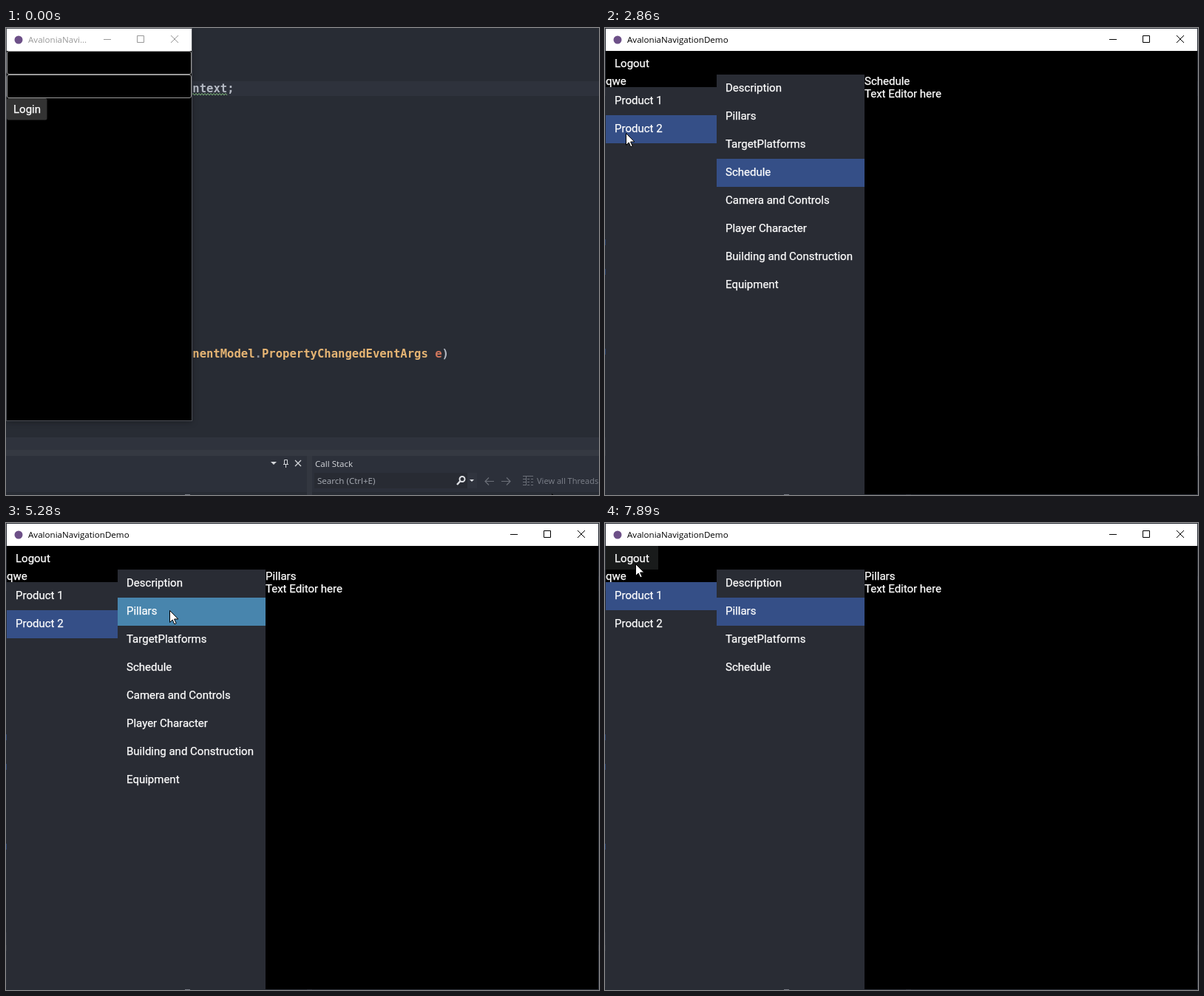
These frames come from a looping animation (802 by 632 pixels, 8000 ms). An HTML page:

```html
<!DOCTYPE html>
<html lang="en">
<head>
<meta charset="utf-8">
<title>Navigation demo</title>
<style>
html, body { margin: 0; width: 100%; height: 100%; overflow: hidden; background: #282c34; }
svg { display: block; width: 802px; height: 632px; }
text { white-space: pre; }
.app { font: 15px Roboto, sans-serif; fill: #fff; stroke: #fff; stroke-width: .25; }
.ui { font: 11.6px "Open Sans", "Noto Sans", sans-serif; }
.code { font: bold 15.57px "DejaVu Sans Mono", monospace; }
.shadow { filter: drop-shadow(0 2px 4px rgba(0, 0, 0, .35)); }
.shadow.active { filter: drop-shadow(0 4px 7px rgba(0, 0, 0, .5)); }
</style>
</head>
<body>
<svg id="stage" viewBox="0 0 802 632"></svg>
<script>
const LOOP = 8000, ACTIVE = 800, FOCUS_2 = 1760, LOGIN = 2550, OPENED = 2800;
const LAG = 40; // delay of hover and click feedback
const USER = 'qwe', TYPE_AT = 1180, TYPE_STEP = 110;
const PRODUCTS = ['Product 1', 'Product 2'];
const ITEMS = ['Description', 'Pillars', 'TargetPlatforms', 'Schedule', 'Camera and Controls',
  'Player Character', 'Building and Construction', 'Equipment'];
const ROW = 38, PRODUCT_Y = 80, ITEM_Y = 63;

// One pointer stroke; dip bows it downwards, click selects the row it ends on
const go = (start, end, x, y, { dip = 0, click = false } = {}) => ({ start, end, x, y, dip, click });
const click = true;
const MOVES = [
  go(0, 0, 738, 630),
  go(30, 200, 190, 272),
  go(360, 1020, 62, 48),
  go(1450, 1700, 50, 86),
  go(1970, 2770, 28, 133),
  go(2780, 2930, 28, 149),
  go(3380, 3920, 134, 154, { dip: 436 }),
  go(3920, 4180, 205, 158, { click }),
  go(4500, 4880, 214, 150),
  go(5040, 5240, 221, 118, { click }),
  go(5320, 5740, 64, 100, { click }),
  go(5860, 6200, 205, 116),
  go(6200, 6380, 220, 86),
  go(6420, 6600, 214, 114, { click }),
  go(6680, 6730, 214, 127),
  go(6900, 7040, 212, 192, { click }),
  go(7080, 7240, 206, 84, { click }),
  go(7280, 7410, 200, 116, { click }),
  go(7450, 7690, 78, 97),
  go(7720, 7890, 41, 55)
];

const rect = (x, y, w, h, fill, more = '') =>
  `<rect x="${x}" y="${y}" width="${w}" height="${h}" fill="${fill}" ${more}/>`;
const text = (cls, x, y, s, more = '') => `<text class="${cls}" x="${x}" y="${y}" ${more}>${s}</text>`;
const span = (color, s) => `<tspan fill="${color}">${s}</tspan>`;
const line = (d, color, w = 1) => `<path d="${d}" fill="none" stroke="${color}" stroke-width="${w}"/>`;
const shape = (d, fill) => `<path d="${d}" fill="${fill}"/>`;

function titleBar(width, title) {
  const r = width + 1;
  return rect(1, 1, width, 30, '#fff') +
    '<circle cx="17" cy="16" r="5.5" fill="#6d5088"/>' +
    text('ui', 30, 20, title, 'fill="currentColor"') +
    line(`M${r - 119} 15.5h10M${r - 73.5} 10.5h9v9h-9zM${r - 28} 10l10 10m0 -10l-10 10`, 'currentColor');
}

function ide() {
  const wave = 'M251 91' + 'l2 -2.5l2 2.5'.repeat(12);
  return rect(0, 0, 802, 632, '#282c34') +
    rect(0, 72, 802, 20, '#2e323c') +
    line(wave, '#7fb97a') +
    text('code', 252.3, 87, 'ntext;', 'fill="#b4b9c3"') +
    text('code', 242.9, 446, span('#e5b473', 'onentModel') + span('#8a8f99', '.') +
      span('#e5b473', 'PropertyChangedEventArgs ') + span('#d0765c', 'e') + span('#b4b9c3', ')')) +
    rect(0, 554, 802, 17, '#2f333d') +
    rect(0, 571, 802, 8, '#353942') +
    rect(0, 579, 802, 53, '#2c303a') +
    rect(407, 579, 7, 53, '#333740') +
    rect(0, 628, 407, 4, '#282c34') +
    rect(414, 628, 388, 4, '#282c34') +
    shape('M358 587h8l-4 4z', '#d4d6da') +
    line('M376.5 584.5h4v6h-4zM375 590.5h7M378.5 591v4', '#d4d6da') +
    line('M391 585l8 8m0 -8l-8 8', '#d4d6da', 1.3) +
    text('ui', 418, 594, 'Call Stack', 'fill="#d4d6da"') +
    rect(417, 602, 220, 21, '#282b33') +
    rect(624, 602, 13, 21, '#30343e') +
    text('ui', 421, 617, 'Search (Ctrl+E)', 'fill="#a8acb4"') +
    '<circle cx="617" cy="610.5" r="3.5" fill="none" stroke="#e0e2e6" stroke-width="2"/>' +
    line('M614.5 613l-4.5 5', '#e0e2e6', 2.4) +
    shape('M627 611h6l-3 3z', '#e0e2e6') +
    line('M660 613.5h-12m5 -5l-5 5l5 5M670 613.5h12m-5 -5l5 5l-5 5', '#6a6e77', 1.2) +
    line('M699 606.5h14M703.5 606v13' + [610.5, 614.5, 618.5].map(y => `M699 ${y}h4m2 0h3m2 0h3`).join(''), '#6a6e77') +
    text('ui', 718, 617, 'View all Threads', 'fill="#7d818a" style="font-size:11.1px"') +
    rect(242, 631, 7, 1, '#777b84') +
    [286, 326, 434].map(y => rect(0, y, 1, 8, '#2a4470')).join('');
}

const field = n => rect(1.5, 32 * n - .5, 249, 31, '#000', `id="field${n}" rx="2.5"`);

function login() {
  return rect(1, 1, 250, 530, '#000', 'id="frame" class="shadow"') +
    `<g id="smallBar">${titleBar(250, 'AvaloniaNavi...')}</g>` +
    rect(.5, .5, 251, 531, 'none', 'id="edge" stroke="#4b4e55"') +
    field(1) + field(2) +
    text('app', 12, 52, '', 'id="typed"') +
    rect(12, 70, 1, 17, '#fff', 'id="caret"') +
    rect(1, 95, 54.5, 29.5, '#333', 'id="button" rx="2.5"') +
    text('app', 10, 115, 'Login');
}

function main() {
  const labels = (list, x, top, id) =>
    list.map((s, i) => text('app', x, top + 23 + i * ROW, s, `id="${id + i}"`)).join('');
  return rect(1, 1, 800, 630, '#000') +
    `<g color="#000">${titleBar(800, 'AvaloniaNavigationDemo')}</g>` +
    rect(1, 31, 71, 32, '#191b1b', 'id="logoutHover"') +
    text('app', 13, 53, 'Logout') +
    text('app', 1, 77, USER) +
    rect(1, PRODUCT_Y, 150, 551, '#292c34') +
    rect(151, ITEM_Y, 200, 568, '#292c34') +
    rect(1, 0, 150, ROW, '#354f87', 'id="productSel"') +
    rect(151, 0, 200, ROW, '#354f87', 'id="itemSel"') +
    rect(0, 0, 200, ROW, '#404040', 'id="hover"') +
    labels(PRODUCTS, 13, PRODUCT_Y, 'product') +
    labels(ITEMS, 163, ITEM_Y, 'item') +
    `<g id="page">${text('app', 351, 77, '', 'id="heading"')}${text('app', 351, 94, 'Text Editor here')}</g>`;
}

const stage = document.getElementById('stage');
stage.innerHTML = ide() + `<g id="login">${login()}</g><g id="main">${main()}</g>` +
  '<path id="arrow" d="M.5 .5V16.5L4.2 13L6.8 18.8L9.2 17.8L6.6 12H11.8Z" fill="#fff" stroke="#000"/>' +
  '<path id="beam" d="M-3 -6.5h2.5l.5 1l.5 -1h2.5M0 -6v12M-3 6.5h2.5l.5 -1l.5 1h2.5" fill="none" stroke="#fff"/>';

const el = {};
stage.querySelectorAll('[id]').forEach(e => el[e.id] = e);
const set = (id, attrs) => { for (const k in attrs) el[id].setAttribute(k, attrs[k]); };
const show = (id, on) => { el[id].style.display = on ? '' : 'none'; };

function pointer(t) {
  const i = Math.max(1, MOVES.filter(m => m.start <= t).length - 1);
  const a = MOVES[i - 1], b = MOVES[i];
  const u = Math.min(1, Math.max(0, (t - b.start) / (b.end - b.start)));
  const e = u * u * (3 - 2 * u);
  return [
    Math.round(a.x + (b.x - a.x) * e),
    Math.round(a.y + (b.y - a.y) * e + b.dip * Math.sin(Math.PI * e))
  ];
}

const itemCount = product => product ? 8 : 4;

// Row under a point, or null
function hit(x, y, product) {
  const left = x < 151, top = left ? PRODUCT_Y : ITEM_Y;
  const row = Math.floor((y - top) / ROW);
  const rows = left ? PRODUCTS.length : itemCount(product);
  return x < 351 && row >= 0 && row < rows ? { left, row, y: top + row * ROW } : null;
}

function selection(t) {
  let product = 1, item = 3;
  for (const m of MOVES) {
    if (!m.click || t < m.end + LAG) continue;
    const { left, row } = hit(m.x, m.y, product);
    if (left) { product = row; item = -1; } else item = row;
  }
  return { product, item };
}

function drawLogin(t, hx, hy) {
  const active = t >= ACTIVE;
  const focus = !active || t >= LOGIN ? 0 : t < FOCUS_2 ? 1 : 2;
  set('smallBar', { color: active ? '#000' : '#999' });
  el.frame.classList.toggle('active', active);
  show('edge', !active);
  for (const n of [1, 2]) {
    const on = focus === n;
    set('field' + n, { stroke: on ? '#4a8cbb' : '#9a9a9a', 'stroke-width': on ? 2 : 1 });
  }
  el.typed.textContent = USER.slice(0, Math.max(0, Math.ceil((t - TYPE_AT) / TYPE_STEP)));
  show('caret', focus);
  set('caret', focus === 1
    ? { x: 12 + Math.round(el.typed.getComputedTextLength()), y: 38 }
    : { x: 12, y: 70 });
  set('button', { fill: hx < 56 && hy >= 95 && hy < 125 ? '#474747' : '#333' });
}

function drawMain(t, hx, hy) {
  const { product, item } = selection(t);
  set('productSel', { y: PRODUCT_Y + product * ROW });
  set('itemSel', { y: ITEM_Y + item * ROW });
  show('itemSel', item >= 0);
  show('page', item >= 0);
  el.heading.textContent = ITEMS[item] || '';
  ITEMS.forEach((_, i) => show('item' + i, i < itemCount(product)));

  const live = t > 3400, over = live && hit(hx, hy, product);
  show('hover', over);
  if (over) {
    const selected = over.row === (over.left ? product : item);
    set('hover', { x: over.left ? 1 : 151, width: over.left ? 150 : 200, y: over.y,
      fill: selected ? '#4885ad' : '#404040' });
  }
  show('logoutHover', live && hx < 72 && hy >= 31 && hy < 63);
}

function draw(t) {
  const [x, y] = pointer(t), [hx, hy] = pointer(t - LAG), open = t >= OPENED;
  show('login', !open);
  show('main', open);
  if (open) drawMain(t, hx, hy); else drawLogin(t, hx, hy);
  const typing = !open && x < 251 && y >= 31 && y < 95;
  show('arrow', !typing);
  show('beam', typing);
  set('arrow', { transform: `translate(${x} ${y})` });
  set('beam', { transform: `translate(${x + .5} ${y})` });
}

const start = performance.now();
function tick() {
  draw((performance.now() - start) % LOOP);
  requestAnimationFrame(tick);
}
tick();
</script>
</body>
</html>
```
